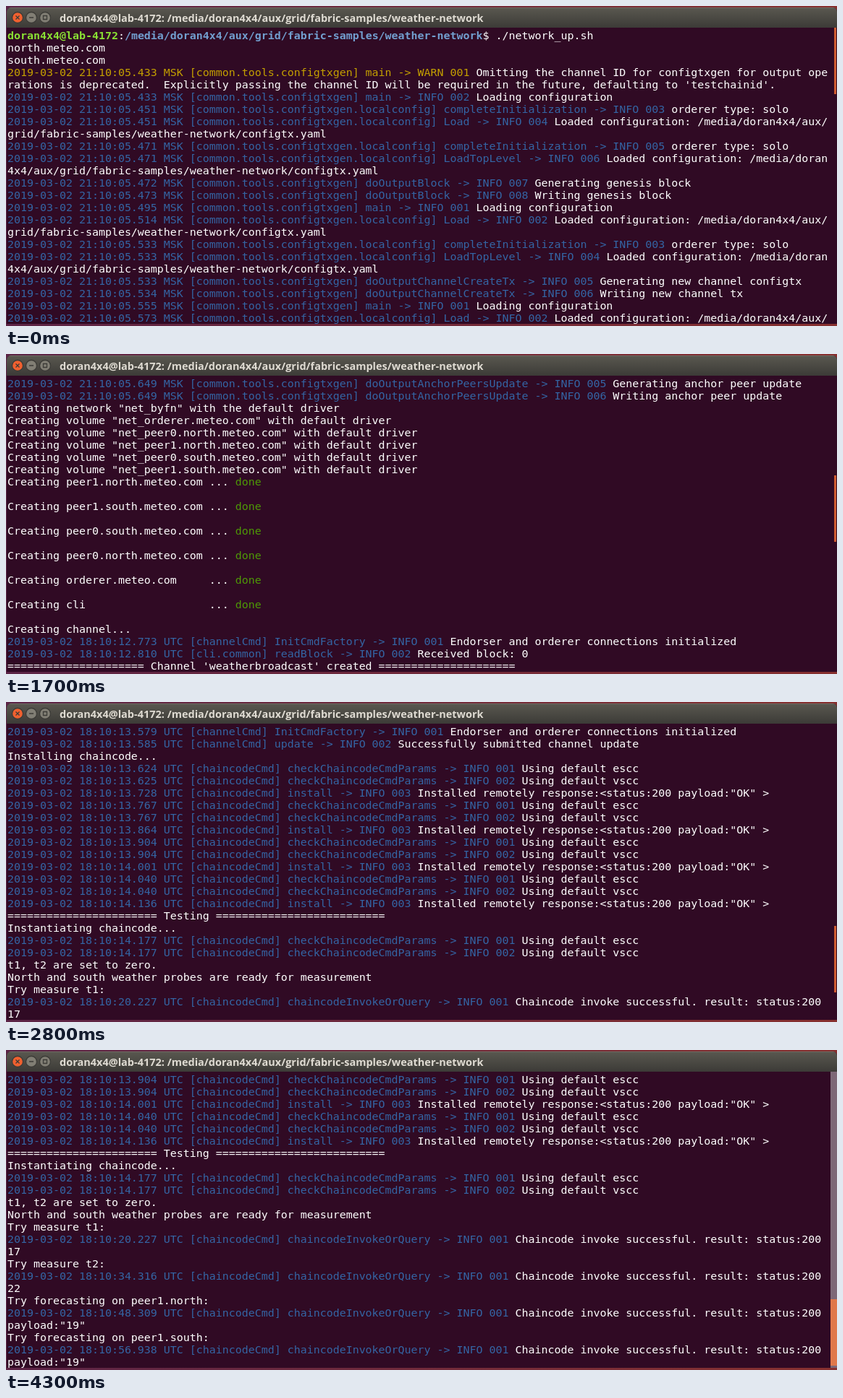
These frames come from a looping animation (1148x443 px, 6300 ms). An HTML page:

```html
<!DOCTYPE html>
<html lang="en">
<head>
<meta charset="utf-8">
<title>Terminal</title>
<style>
html, body { margin: 0; width: 100%; height: 100%; overflow: hidden; }
body { position: relative; background: linear-gradient(90deg, #5b2446, #87302f); }
div, svg { position: absolute; }
#window { left: 1px; top: 2px; width: 1147px; height: 438px; background: #300a24; border-radius: 6px 6px 0 0; overflow: hidden; }
#bar { width: 100%; height: 28px; background: linear-gradient(#5a5850, #3c3b37); box-shadow: inset 0 1px #6d6b62; }
#title { left: 73px; top: 4px; font: bold 14.5px/21px "Open Sans", sans-serif; color: #dfdbd2; white-space: pre; }
#view { left: 1px; top: 31px; width: 1138px; height: 407px; overflow: hidden; }
#log { width: 100%; font: 14.95px/17px "DejaVu Sans Mono", monospace; color: #fff; white-space: pre-wrap; line-break: anywhere; font-variant-ligatures: none; }
.info { color: #3465a4; }
.warn { color: #c4a000; }
.done { color: #4e9a06; }
.user { color: #8ae234; font-weight: bold; }
.path { color: #729fcf; font-weight: bold; }
#track { top: 28px; right: 0; width: 9px; height: 410px; }
#thumb { right: 1px; width: 3px; height: 92px; background: #cf5a30; }
.wide#track { background: #7d6877; }
.wide #thumb { right: 0; width: 9px; background: #e0784a; }
</style>
</head>
<body>
<div id="window">
  <div id="bar">
    <svg width="70" height="28" fill="none" stroke="#3c3b37" stroke-width="1.3">
      <circle cx="15" cy="14" r="7.5" fill="#f0602f"/>
      <circle cx="34" cy="14" r="7.5" fill="#817e74"/>
      <circle cx="53" cy="14" r="7.5" fill="#817e74"/>
      <path d="M12.5 11.5l5 5m0-5l-5 5M31 14h6M50.5 11.5h5v5h-5z"/>
    </svg>
    <div id="title"></div>
  </div>
  <div id="view"><div id="log"></div></div>
  <div id="track"><div id="thumb"></div></div>
</div>
<script>
const $ = id => document.getElementById(id);
const user = 'doran4x4', host = user + '@lab-4172';
const cwd = `/media/${user}/aux/grid/fabric-samples/weather-network`;
const ROW = 17, LOOP = 6300;

const lines = [];
const say = (...text) => lines.push(...text);
const span = (tone, text) => `<span class="${tone}">${text}</span>`;
const entry = (time, tool, call, n, text, level = 'INFO') =>
  say(span(level.toLowerCase(), `2019-03-02 ${time} [${tool}] ${call} -> ${level} 00${n}`) + ' ' + text);

// Configuration tool output
const gen = (ms, call, n, text, level) =>
  entry(`21:10:05.${ms} MSK`, 'common.tools.configtxgen', call, n, text, level);
const local = (ms, call, n, text) =>
  entry(`21:10:05.${ms} MSK`, 'common.tools.configtxgen.localconfig', call, n, text);
const main = (ms, n) => gen(ms, 'main', n, 'Loading configuration');
const init = (ms, n) => local(ms, 'completeInitialization', n, 'orderer type: solo');
const load = (ms, call, n) => local(ms, call, n, `Loaded configuration: ${cwd}/configtx.yaml`);
const output = (call, what, n, start, end) => {
  gen(start, call, n, 'Generating ' + what[0]);
  gen(end, call, n + 1, 'Writing ' + what[1]);
};
const generate = (call, what, [begin, loaded, ready, start, end]) => {
  main(begin, 1);
  load(loaded, 'Load', 2);
  init(ready, 3);
  load(ready, 'LoadTopLevel', 4);
  output(call, what, 5, start, end);
};

// Network output
const cmd = (time, tool, call, n, text) => entry(`18:10:${time} UTC`, tool, call, n, text);
const connect = time => cmd(time, 'channelCmd', 'InitCmdFactory', 1, 'Endorser and orderer connections initialized');
const check = (first, second) => [first, second].forEach((time, i) =>
  cmd(time, 'chaincodeCmd', 'checkChaincodeCmdParams', i + 1, `Using default ${'ev'[i]}scc`));
const invoke = (task, time, result) => {
  say(`Try ${task}:`);
  cmd(time, 'chaincodeCmd', 'chaincodeInvokeOrQuery', 1, 'Chaincode invoke successful. result: status:200');
  say(result);
};
const banner = (text, before = 21, after = before) => say(`${'='.repeat(before)} ${text} ${'='.repeat(after)}`);

say(`${span('user', host)}:${span('path', cwd)}$ ./network_up.sh`, 'north.meteo.com', 'south.meteo.com');
gen(433, 'main', 1, 'Omitting the channel ID for configtxgen for output operations is deprecated.  ' +
  "Explicitly passing the channel ID will be required in the future, defaulting to 'testchainid'.", 'WARN');
main(433, 2);
init(451, 3);
load(451, 'Load', 4);
init(471, 5);
load(471, 'LoadTopLevel', 6);
output('doOutputBlock', ['genesis block', 'genesis block'], 7, 472, 473);
const anchor = ['anchor peer update', 'anchor peer update'];
generate('doOutputChannelCreateTx', ['new channel configtx', 'new channel tx'], [495, 514, 533, 533, 534]);
generate('doOutputAnchorPeersUpdate', anchor, [555, 573, 591, 591, 592]);
generate('doOutputAnchorPeersUpdate', anchor, [612, 630, 649, 649, 649]);

say('Creating network "net_byfn" with the default driver');
for (const name of ['orderer', 'peer0.north', 'peer1.north', 'peer0.south', 'peer1.south'])
  say(`Creating volume "net_${name}.meteo.com" with default driver`);
for (const name of ['peer1.north', 'peer1.south', 'peer0.south', 'peer0.north', 'orderer', 'cli'])
  say(`Creating ${(name === 'cli' ? name : name + '.meteo.com').padEnd(21)} ... ${span('done', 'done')}`, '');

say('Creating channel...');
connect('12.773');
cmd('12.810', 'cli.common', 'readBlock', 2, 'Received block: 0');
banner("Channel 'weatherbroadcast' created");
say('Joining all peers to channel...');
for (const [start, end] of [['12.886', '13.002'], ['13.064', '13.180'], ['13.250', '13.355'], ['13.397', '13.498']]) {
  connect(start);
  cmd(end, 'channelCmd', 'executeJoin', 2, 'Successfully submitted proposal to join channel');
}
banner('peers joined');
say('Updating anchor peers...');
for (const [start, end] of [['13.536', '13.541'], ['13.579', '13.585']]) {
  connect(start);
  cmd(end, 'channelCmd', 'update', 2, 'Successfully submitted channel update');
}
say('Installing chaincode...');
for (const [first, second, end] of [['13.624', '13.625', '13.728'], ['13.767', '13.767', '13.864'],
  ['13.904', '13.904', '14.001'], ['14.040', '14.040', '14.136']]) {
  check(first, second);
  cmd(end, 'chaincodeCmd', 'install', 3, 'Installed remotely response:&lt;status:200 payload:"OK" >');
}
banner('Testing', 23, 26);
say('Instantiating chaincode...');
check('14.177', '14.177');
say('t1, t2 are set to zero.', 'North and south weather probes are ready for measurement');
invoke('measure t1', '20.227', '17');
invoke('measure t2', '34.316', '22');
invoke('forecasting on peer1.north', '48.309', 'payload:"19"');
invoke('forecasting on peer1.south', '56.938', 'payload:"19"');

$('title').textContent = `${host}: ${cwd}`;
$('log').innerHTML = lines.join('\n');

// [start time, first visible row]
const scroll = [[0, 0], [1000, 14], [1200, 31], [1700, 36], [1900, 46], [2100, 65],
  [2300, 70], [2800, 73], [3300, 76], [3800, 79], [4300, 82]];

function draw(now) {
  const time = now % LOOP;
  const row = scroll.findLast(([start]) => start <= time)[1];
  $('log').style.top = -row * ROW + 'px';
  $('thumb').style.top = Math.round(row * 3.84) + 'px';
  $('track').className = time >= 3300 ? 'wide' : '';
  requestAnimationFrame(draw);
}
draw(0);
</script>
</body>
</html>
```
